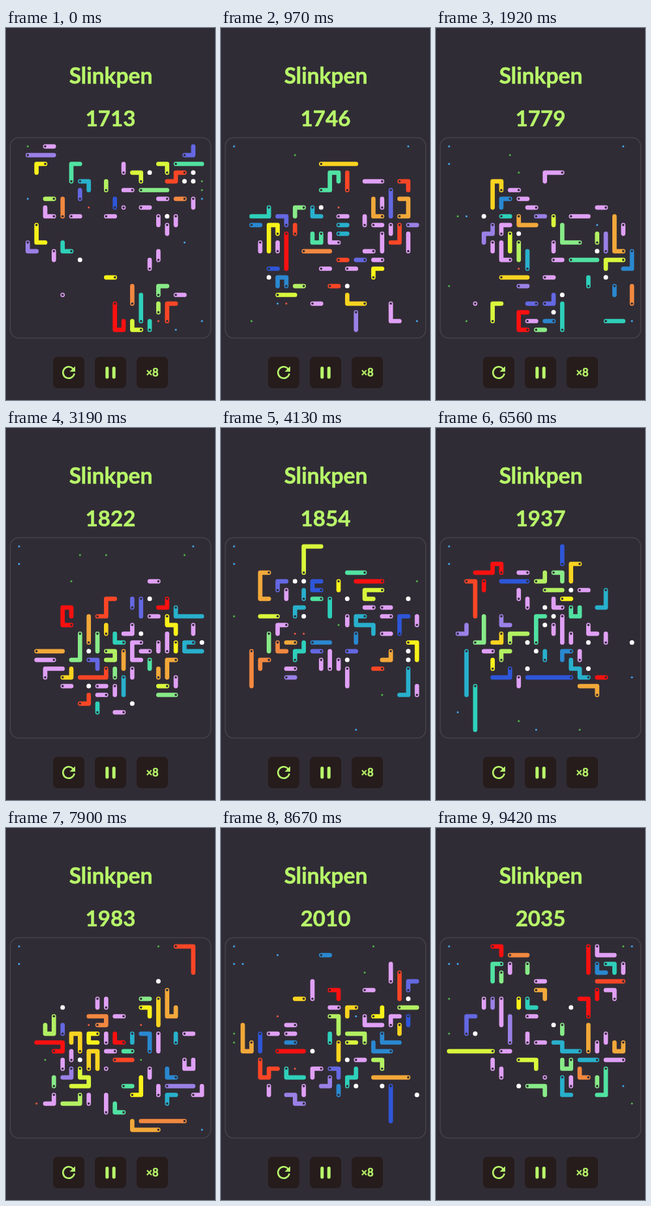
Recreate the animation shown at these times as an HTML page. Size 320 px wide and 568 px high, loop 9.52 s.

```html
<!DOCTYPE html>
<html lang="en">
<head>
<meta charset="utf-8">
<title>Slinkpen</title>
<style>
  html, body { margin: 0; width: 100%; height: 100%; overflow: hidden; background: #302c35; }
  svg { display: block; width: 100%; height: 100%; }
  text { font-family: Lato, "Open Sans", sans-serif; font-weight: 700; text-anchor: middle;
         fill: #b8f76a; stroke: #b8f76a; stroke-width: .5; stroke-linejoin: round; }
  .button { fill: #261c1c; }
  .icon { fill: none; stroke: #b8f76a; stroke-linecap: round; stroke-linejoin: round; }
</style>
</head>
<body>
<svg viewBox="0 0 320 568">
  <rect width="320" height="568" fill="#302c35"/>
  <text x="160.5" y="85" font-size="33.5">Slinkpen</text>
  <text id="count" x="160" y="150" font-size="33"></text>
  <rect x="6.5" y="167.5" width="307" height="306" rx="13" fill="none" stroke="#46424b" stroke-width="1.5"/>
  <g id="pit" fill="none" stroke-width="6.7" stroke-linecap="round" stroke-linejoin="round"></g>
  <rect class="button" x="72" y="502" width="48" height="48" rx="7"/>
  <rect class="button" x="136" y="502" width="48" height="48" rx="7"/>
  <rect class="button" x="200" y="502" width="48" height="48" rx="7"/>
  <path class="icon" stroke-width="2.6" d="M102.2 519.8A8.75 8.75 0 1 0 104.4 528.5"/>
  <path d="M106 516.5V524.8H97.5Z" fill="#b8f76a"/>
  <path class="icon" stroke-width="5" d="M154.8 519.5V533M165.2 519.5V533"/>
  <text x="224" y="531.5" font-size="16.5">×8</text>
</svg>
<script>
const LOOP = 9520, TICK = 29.2, TICKS = 322, FIRST = 1713, SIZE = 22;
const PINK_AGE = 50, HUE_AGE = 6, HATCH = 18, CROWD = 52, MAX_LEN = 6;

// Young to old
const COLORS = ['#e0a0f5', '#9a80e6', '#6468e2', '#2e56d8', '#2a88d0', '#28b0cc', '#2ed0ba', '#50e2a2',
  '#88ea88', '#b2f062', '#d8f83c', '#f8f21a', '#f8d420', '#f2a83a', '#f28840', '#fa4626', '#fa1010'];
const LIFE = PINK_AGE + HUE_AGE * (COLORS.length - 1);
const DOTS = ['#4fb84a', '#42a8f0', '#f05a44'];
const DIRS = { U: [0, -1], R: [1, 0], D: [0, 1], L: [-1, 0] };

// Head column and row, body from head to tail, age letter
const SNAKES = `3 0 R a, 1 1 RRR b, 3 2 LD l, 6 4 UUR h, 7 4 RD f, 7 6 U c, 10 5 U j, 12 3 U a,
  14 4 UL k, 13 5 L a, 14 5 RRR i, 17 3 UL k, 18 2 RRR h, 19 1 RU c, 19 3 LDL p, 17 6 L a,
  19 6 L o, 20 6 D a, 4 6 L j, 4 8 LU a, 5 8 UU o, 6 8 R a, 10 8 R a, 11 7 U d, 12 7 - a,
  14 7 R a, 16 8 D a, 17 9 D a, 18 8 D a, 2 9 DDR l, 1 11 DR b, 4 12 D a, 6 12 LU g,
  16 13 U a, 15 14 U a, 11 15 L l, 5 17 - a, 13 18 UU o, 14 20 UUU g, 16 17 UR i, 18 17 R a,
  16 19 U j, 17 20 UUR p, 11 18 DDDRU q, 14 21 LU k, 15 21 U g`;
const EGGS = '15 3, 20 3, 19 4, 20 4, 17 8, 7 13';
const FOOD = ['1 0, 21 4, 21 5', '1 6, 21 6, 19 11, 21 20, 18 21', '8 7, 16 20'];

// The crowd drifts between these: tick, column, row
const DRIFT = [[0, 11, 10], [66, 12, 15], [109, 12, 10], [175, 11, 8], [224, 9, 10], [270, 13, 13], [322, 11, 8]];

let seed = 1713;
function random() {
  seed = (seed + 0x6D2B79F5) | 0;
  let n = Math.imul(seed ^ (seed >>> 15), 1 | seed);
  n = (n + Math.imul(n ^ (n >>> 7), 61 | n)) ^ n;
  return ((n ^ (n >>> 14)) >>> 0) / 4294967296;
}
const pick = n => Math.floor(random() * n);
const key = (x, y) => y * SIZE + x;
const parse = text => text.split(',').map(item => item.trim().split(' '));

const snakes = parse(SNAKES).map(([col, row, body, letter]) => {
  let x = +col, y = +row;
  const cells = [[x, y]];
  for (const d of body) if (DIRS[d]) {
    x += DIRS[d][0];
    y += DIRS[d][1];
    cells.push([x, y]);
  }
  const hue = letter.charCodeAt(0) - 97;
  const age = hue ? PINK_AGE + HUE_AGE * (hue - 1) + pick(HUE_AGE) : pick(PINK_AGE);
  return { cells, age, grow: cells.length < 2 ? 1 : 0 };
});
let eggs = parse(EGGS).map(([x, y]) => ({ x: +x, y: +y, left: 2 + pick(HATCH) }));
let food = FOOD.flatMap((text, kind) => parse(text).map(([x, y]) => ({ x: +x, y: +y, kind })));

function centre(tick) {
  const i = Math.max(1, DRIFT.findIndex(p => p[0] >= tick));
  const [a, b] = [DRIFT[i - 1], DRIFT[i]];
  const k = (tick - a[0]) / (b[0] - a[0]);
  return [a[1] + (b[1] - a[1]) * k, a[2] + (b[2] - a[2]) * k];
}

function nearestFood(x, y) {
  let best = 4;
  for (const f of food) best = Math.min(best, Math.abs(f.x - x) + Math.abs(f.y - y));
  return best;
}

function move(snake, taken, [cx, cy]) {
  const [x, y] = snake.cells[0], neck = snake.cells[1] || [x, y];
  let best = null, top = -Infinity;
  for (const [dx, dy] of Object.values(DIRS)) {
    const nx = x + dx, ny = y + dy;
    if (nx < 0 || ny < 0 || nx >= SIZE || ny >= SIZE || taken.has(key(nx, ny))) continue;
    const straight = dx === x - neck[0] && dy === y - neck[1];
    const stray = Math.max(0, Math.abs(nx - cx) - 7) + Math.max(0, Math.abs(ny - cy) - 5);
    const score = random() * 2.4 + (straight ? 0.9 : 0) - stray * 1.3 - nearestFood(nx, ny) * 0.8;
    if (score > top) { top = score; best = [nx, ny]; }
  }
  if (!best) return;
  snake.cells.unshift(best);
  taken.add(key(...best));
  const meal = food.findIndex(f => f.x === best[0] && f.y === best[1]);
  if (meal >= 0) {
    food.splice(meal, 1);
    if (snake.cells.length <= MAX_LEN) snake.grow++;
  }
  if (snake.grow > 0) snake.grow--;
  else taken.delete(key(...snake.cells.pop()));
}

function step(tick) {
  const taken = new Set(eggs.map(e => key(e.x, e.y)));
  for (const s of snakes) for (const c of s.cells) taken.add(key(...c));
  const goal = centre(tick);
  for (let i = snakes.length - 1; i >= 0; i--) {
    const s = snakes[i];
    if (++s.age >= LIFE) {
      const [x, y] = s.cells[0];
      food.push({ x, y, kind: 2 });
      for (const c of s.cells) taken.delete(key(...c));
      snakes.splice(i, 1);
      continue;
    }
    const [x, y] = s.cells[s.cells.length - 1];
    move(s, taken, goal);
    const free = !taken.has(key(x, y));
    if (free && s.age > PINK_AGE && snakes.length + eggs.length < CROWD && random() < 0.05) {
      eggs.push({ x, y, left: HATCH });
      taken.add(key(x, y));
    }
  }
  eggs = eggs.filter(e => {
    if (--e.left > 0) return true;
    snakes.push({ cells: [[e.x, e.y]], age: 0, grow: 1 });
    return false;
  });
  if (food.length < 12 && random() < 0.7) {
    const x = pick(SIZE), y = pick(SIZE);
    if (!taken.has(key(x, y))) food.push({ x, y, kind: random() < 0.6 ? 0 : 1 });
  }
}

const px = c => (20 + c * 40 / 3).toFixed(1);
const py = r => (180.8 + r * 40 / 3).toFixed(1);
const disc = (x, y, r, fill) => `<circle cx="${px(x)}" cy="${py(y)}" r="${r}" fill="${fill}" stroke="none"/>`;

function drawSnake({ cells, age }) {
  const hue = age < PINK_AGE ? 0 : 1 + Math.floor((age - PINK_AGE) / HUE_AGE);
  const [x, y] = cells[0], color = COLORS[hue];
  const body = cells.length > 1
    ? `<path d="M${cells.map(c => px(c[0]) + ' ' + py(c[1])).join('L')}" stroke="${color}"/>`
    : disc(x, y, 3.35, color);
  return body + disc(x, y, 1.8, '#302c35');
}

function drawPit() {
  return food.map(f => disc(f.x, f.y, 1.5, DOTS[f.kind])).join('')
    + eggs.map(e => disc(e.x, e.y, 3.5, '#fff')).join('')
    + snakes.map(drawSnake).join('');
}

const scenes = [drawPit()];
for (let tick = 1; tick <= TICKS; tick++) {
  step(tick);
  scenes.push(drawPit());
}

const pit = document.getElementById('pit'), count = document.getElementById('count');
const start = performance.now();
let shown = -1;

function update(now) {
  const time = Math.max(0, now - start) % LOOP;
  const tick = Math.min(TICKS, Math.floor(time / TICK + 0.3));
  if (tick !== shown) {
    shown = tick;
    pit.innerHTML = scenes[tick];
    count.textContent = FIRST + tick;
  }
  requestAnimationFrame(update);
}
update(start);
</script>
</body>
</html>
```
